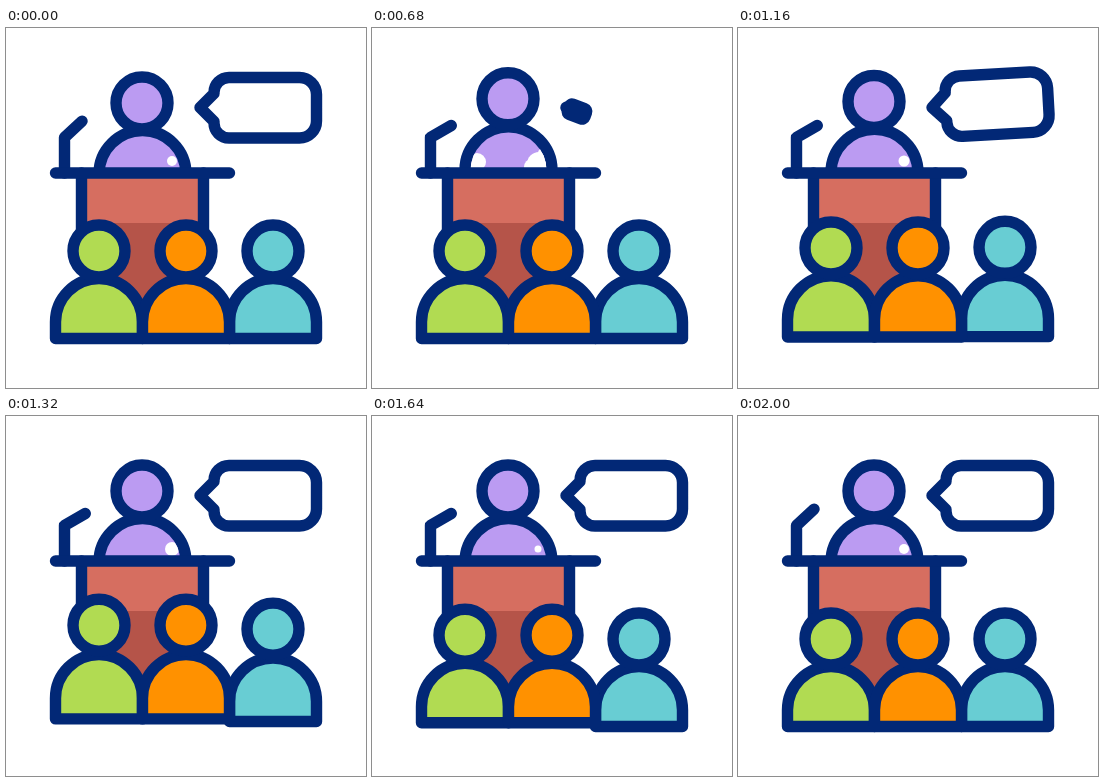
Write an HTML page with a canvas that moves like this. It is 360 by 360 pixels and loops after 2.12 s.

```html
<!DOCTYPE html>
<html lang="en">
<head>
<meta charset="utf-8">
<title>Public speaking</title>
<style>
html, body { margin: 0; width: 100%; height: 100%; overflow: hidden; background: #fff; }
canvas { display: block; width: 360px; height: 360px; }
</style>
</head>
<body>
<canvas id="stage"></canvas>
<script>
const canvas = document.getElementById('stage');
const ctx = canvas.getContext('2d');
const dpr = window.devicePixelRatio || 1;
canvas.width = canvas.height = 360 * dpr;

const LOOP = 2120, STEP = 40, HOLD = 200, LAST = 2000;
const NAVY = '#022876', PURPLE = '#bb9bf2';
const TIP = { x: 194, y: 79.5 };
const SWAP = 527; // the bubble has left the stage and grows anew

const clamp = v => Math.max(0, Math.min(1, v));
const span = (t, a, b) => clamp((t - a) / (b - a));
const ease = u => (1 - Math.cos(Math.PI * u)) / 2;
const mix = (a, b, u) => a + (b - a) * u;

// Eased value through [time, value] stops
function track(t, stops) {
  let v = stops[0][1];
  for (let i = 1; i < stops.length; i++) {
    const [a, from] = stops[i - 1], [b, to] = stops[i];
    if (t >= a) v = mix(from, to, ease(span(t, a, b)));
  }
  return v;
}

const hop = (t, start, peak, end, height) =>
  track(t, [[start, 0], [peak, height], [end, 0]]);

function dot(x, y, r, color) {
  ctx.beginPath();
  ctx.arc(x, y, r, 0, 2 * Math.PI);
  ctx.fillStyle = color;
  ctx.fill();
}

function line(...pts) {
  ctx.beginPath();
  for (let i = 0; i < pts.length; i += 2) ctx.lineTo(pts[i], pts[i + 1]);
  ctx.stroke();
}

function body(x, y, base, color) {
  ctx.beginPath();
  ctx.moveTo(x - 43.5, base);
  ctx.arc(x, y, 43.5, Math.PI, 0);
  ctx.lineTo(x + 43.5, base);
  ctx.closePath();
  ctx.fillStyle = color;
  ctx.fill();
  ctx.stroke();
}

function head(x, y, color) {
  dot(x, y, 26, color);
  ctx.stroke();
}

function listener(x, lift, feet, color) {
  body(x, 294 - lift * 0.86, 310.5 - feet, color);
  head(x, 223 - lift, color);
}

function glints(t) {
  const wide = hop(t, 580, 680, 780, 1);
  if (wide > 0) {
    dot(105, 134, 9 * wide, '#fff');
    dot(160, 139, 8 * wide, '#fff');
    dot(167, 136, 12 * wide, '#fff');
    dot(177, 129, 12 * wide, '#fff');
  }
  const r = track(t, [[200, 5], [360, 2], [560, 2], [1000, 4],
                      [1320, 7], [1640, 3.5], [2000, 5]]);
  dot(166, 133, r, '#fff');
}

function speaker(t) {
  const lift = hop(t, 480, 840, 1300, 7.2);
  const y = 146 - lift * 0.85;
  body(136.5, y, 147, PURPLE);
  ctx.save();
  ctx.beginPath();
  ctx.arc(136.5, y, 38, Math.PI, 0);
  ctx.lineTo(174.5, 147);
  ctx.lineTo(98.5, 147);
  ctx.clip();
  glints(t);
  ctx.restore();
  head(136, 75 - lift, PURPLE);
}

function podium() {
  ctx.fillStyle = '#d66e60';
  ctx.fillRect(76, 145, 121, 50);
  ctx.fillStyle = '#b55449';
  ctx.fillRect(76, 195, 121, 83);
  line(75.5, 145, 75.5, 226);
  line(197.5, 145, 197.5, 226);
  line(49.5, 145, 223.5, 145);
}

function mic(t) {
  const a = track(t, [[180, -43], [360, -30], [1740, -30], [1980, -43]]) * Math.PI / 180;
  line(58.5, 145, 58.5, 109.5, 58.5 + 24 * Math.cos(a), 109.5 + 24 * Math.sin(a));
}

function bubble(t) {
  const back = t > SWAP;
  const rise = back ? 0 : 122 * Math.pow(span(t, HOLD, SWAP), 3);
  const size = back ? ease(span(t, SWAP, 1075)) : 1;
  const turn = back ? track(t, [[SWAP, 30], [980, -8.5], [1290, 0]]) : 0;

  // Only the path is scaled; the pen keeps its width
  ctx.save();
  ctx.translate(TIP.x, TIP.y - rise);
  ctx.rotate(turn * Math.PI / 180);
  ctx.scale(size, size);
  ctx.beginPath();
  ctx.moveTo(0, 0);
  ctx.lineTo(14, -14);
  ctx.arcTo(14, -30, 30, -30, 15);
  ctx.arcTo(116.5, -30, 116.5, 0, 17);
  ctx.arcTo(116.5, 30.5, 90, 30.5, 17);
  ctx.arcTo(14, 30.5, 14, 14, 15);
  ctx.lineTo(14, 14);
  ctx.closePath();
  ctx.restore();
  ctx.fillStyle = '#fff';
  ctx.fill();
  ctx.stroke();
}

function audience(t) {
  const pair = hop(t, 1080, 1340, 1800, 14);
  const pairFeet = hop(t, 1080, 1360, 1900, 8);
  const solo = hop(t, 1060, 1300, 1600, 10);
  listener(267, solo, solo * 0.5, '#68cdd3');
  listener(93, pair, pairFeet, '#b1db52');
  listener(180, pair, pairFeet, '#ff9100');
}

function draw(t) {
  ctx.setTransform(dpr, 0, 0, dpr, 0, 0);
  ctx.fillStyle = '#fff';
  ctx.fillRect(0, 0, 360, 360);
  ctx.strokeStyle = NAVY;
  ctx.lineWidth = 11.4;
  ctx.lineCap = ctx.lineJoin = 'round';

  bubble(t);
  speaker(t);
  mic(t);
  podium();
  audience(t);
}

const start = performance.now();

function tick(now) {
  const t = Math.max(0, now - start) % LOOP;
  draw(t < HOLD ? 0 : Math.min(LAST, Math.floor(t / STEP) * STEP));
  requestAnimationFrame(tick);
}

tick(start);
</script>
</body>
</html>
```
